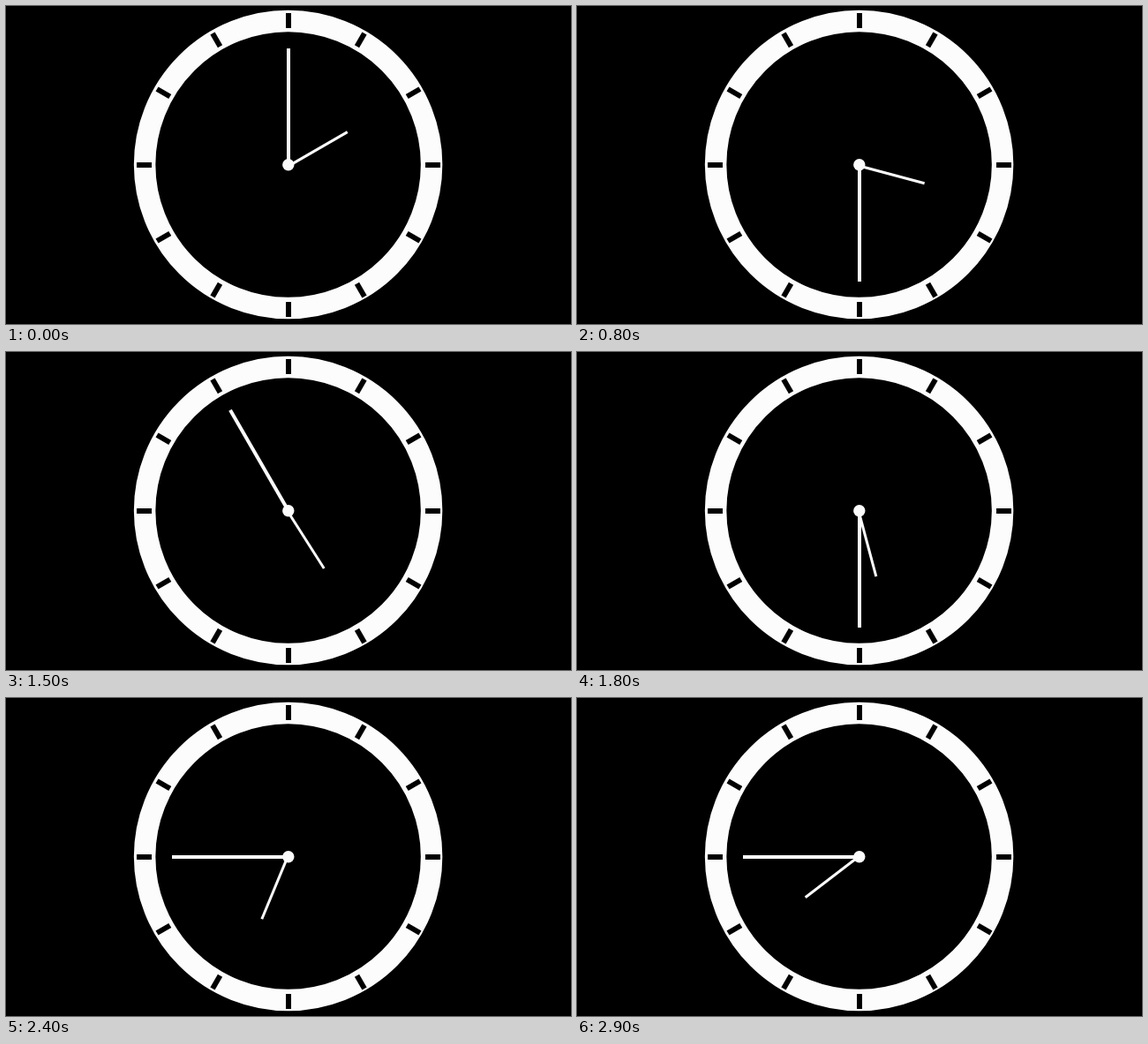
Write an HTML page that moves like this. It is 640x360 px and loops after 3 s.

```html
<!DOCTYPE html>
<html lang="en">
<head>
<meta charset="utf-8">
<title>Clock</title>
<style>
  html, body { margin: 0; width: 100%; height: 100%; overflow: hidden; background: #000; }
  svg { display: block; width: 640px; height: 360px; }
</style>
</head>
<body>
<svg viewBox="0 0 640 360">
  <circle cx="319.6" cy="179.5" r="162.5" fill="none" stroke="#fcfcfc" stroke-width="24.5"/>
  <g transform="translate(320 180)">
    <g id="ticks" stroke="#000" stroke-width="6"></g>
    <g stroke="#fcfcfc">
      <path id="hour" d="M1 0V-76.5" stroke-width="3"/>
      <path id="minute" d="M0 0V-132" stroke-width="4"/>
    </g>
    <circle cx="-.2" cy="-.2" r="6.7" fill="#fcfcfc"/>
  </g>
</svg>
<script>
  const LOOP = 3000, STEP = 100;
  const $ = id => document.getElementById(id);
  const turn = (el, deg) => el.setAttribute('transform', `rotate(${deg})`);

  for (let i = 0; i < 12; i++) {
    const tick = document.createElementNS('http://www.w3.org/2000/svg', 'path');
    tick.setAttribute('d', 'M0-172V-155');
    turn(tick, i * 30);
    $('ticks').append(tick);
  }

  const start = performance.now();

  // The clock starts at two and jumps in multiples of five minutes.
  function draw() {
    const t = Math.max(0, performance.now() - start) % LOOP;
    const step = Math.floor(t / STEP);
    const fives = Math.max(0, Math.floor(step * 2.4 - 0.5));
    turn($('minute'), fives * 30);
    turn($('hour'), 60 + fives * 2.5);
    requestAnimationFrame(draw);
  }
  draw();
</script>
</body>
</html>
```
